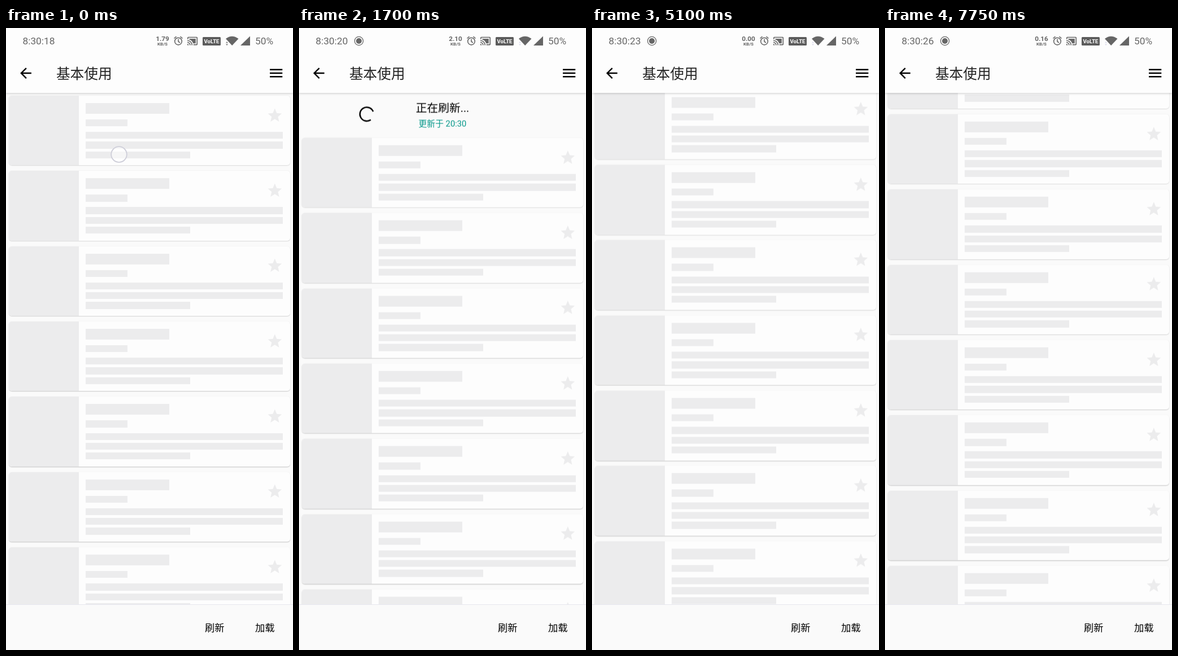
Write an HTML page that moves like this. It is 508x1102 px and loops after 8000 ms.

```html
<!DOCTYPE html>
<html lang="zh-CN">
<head>
<meta charset="utf-8">
<style>
  html, body { margin: 0; width: 100%; height: 100%; overflow: hidden; background: #fafafa; }
  #stage { position: relative; width: 508px; height: 1102px; overflow: hidden; background: #fafafa; }
  #stage, text { font-family: Roboto, "Noto Sans CJK SC", "Noto Sans CJK", sans-serif; }
  #view { position: absolute; left: 0; top: 114.6px; width: 508px; height: 906.9px; overflow: hidden; }
  #list { position: absolute; left: 0; top: 0; width: 508px; will-change: transform; }
  .card { position: absolute; left: 4.9px; width: 498.2px; height: 123.5px; border-radius: 5px; background: #fdfdfd;
    box-shadow: 0 var(--drop) 1.5px rgba(0,0,0,.16), 0 .5px 2.5px rgba(0,0,0,.06); }
  .card i { position: absolute; background: #ececed; }
  .card svg { position: absolute; left: 456.3px; top: 19.7px; width: 29.6px; height: 29.6px; fill: #ececed; }
  .panel { position: absolute; left: 0; width: 508px; height: 74.1px; overflow: visible; }
  .panel text { text-anchor: middle; }
  .panel .info { font-size: 14.8px; fill: #009688; }
  .panel .title { font-size: 19.75px; }
  #bar { position: absolute; left: 0; top: 0; width: 508px; height: 114.6px; background: #fdfdfd;
    box-shadow: 0 1px 4px rgba(0,0,0,.2); }
  #buttons { position: absolute; left: 0; top: 1021px; width: 508px; height: 81px; background: #fafafa;
    box-shadow: inset 0 1px #e6e6ee; }
  #top { position: absolute; left: 0; top: 0; }
  .status { fill: #666; }
  .speed { font-weight: 700; text-anchor: middle; }
</style>
</head>
<body>
<div id="stage">
  <div id="view"><div id="list"></div></div>
  <div id="bar"></div>
  <div id="buttons"></div>
  <svg id="top" width="508" height="1102">
    <g class="status">
      <text id="clock" x="29.5" y="29.3" font-size="17.3"></text>
      <g id="rec">
        <circle cx="106" cy="23" r="7.6" fill="none" stroke="#666" stroke-width="1.3"/>
        <circle cx="106" cy="23" r="5"/>
      </g>
      <text id="speed" class="speed" x="277" y="22.6" font-size="11.8"></text>
      <text class="speed" x="277" y="30.8" font-size="8">KB/S</text>
      <g fill="none" stroke="#666" stroke-width="1.6">
        <circle cx="305" cy="23.6" r="6.3"/>
        <path d="M305 19.5v4.5l3 2M297.5 18.5l4-3.3M312.5 18.5l-4-3.3"/>
      </g>
      <path transform="translate(320.2 13.2) scale(.82)" d="M21 3H3c-1.100 0-2 .9-2 2v3h2V5h18v14h-7v2h7c1.100 0 2-.9 2-2V5c0-1.100-.9-2-2-2zM1 18v3h3c0-1.660-1.340-3-3-3zm0-4v2c2.760 0 5 2.240 5 5h2c0-3.870-3.130-7-7-7zm0-4v2c4.970 0 9 4.030 9 9h2c0-6.080-4.930-11-11-11zM19 7H5v1.630c3.960 1.280 7.090 4.410 8.370 8.370H19z"/>
      <rect x="348" y="16" width="32" height="15" rx="1.5" fill="#5c5c5c"/>
      <text x="364" y="27.2" font-size="9.6" font-weight="700" text-anchor="middle" fill="#fff">VoLTE</text>
      <path d="M389 19Q400 10.500 411.500 19L400.200 31z"/>
      <path id="net" d="M389 26.500l2-2.500 2 2.500zM389 28.500l2 2.500 2-2.500z"/>
      <path d="M432 14.500V31H415z"/>
      <text x="441" y="29.3" font-size="17.3">50%</text>
    </g>
    <path transform="translate(20.200 65.200) scale(1.235)" d="M20 11H7.830l5.590-5.590L12 4l-8 8 8 8 1.410-1.410L7.830 13H20z"/>
    <path transform="translate(463.300 65.200) scale(1.235)" d="M3 18h18v-2H3zm0-5h18v-2H3zm0-7v2h18V6z"/>
    <text x="88.9" y="89.8" font-size="24.7" fill="#222">基本使用</text>
    <text x="352" y="1069.3" font-size="17.3" font-weight="500">刷新</text>
    <text x="441" y="1069.3" font-size="17.3" font-weight="500">加载</text>
    <circle id="finger" r="13.8" fill="rgba(255,255,255,.5)" stroke="#ceced9" stroke-width="1.8"/>
  </svg>
</div>
<script>
const LOOP = 8000, VIEW = 906.9, PITCH = 133.35, PANEL = 74.1, ROWS = 20;
const END = ROWS * PITCH + PANEL - VIEW;
const RELEASE = 1045, REFRESHED = 3100, COLLAPSE = 4000, LOADED = 7750;
const PULL = { from: 180, ms: 800, dist: 455 };
const FLICK = { from: 4850, ms: 150, dist: 330, glide: 1898, drag: .135 };
const R1 = 9.08, R2 = 22.04;            // decay rates of the overdamped spring
const $ = id => document.getElementById(id);
const clamp = v => Math.max(0, Math.min(1, v));
const list = $('list'), cards = [];

function addCard(row) {
  const bars = [[0, 0, 124, 123.5], [136, 13, 148, 19], [136, 42, 74, 12.3],
    [136, 64.2, 349, 12.3], [136, 81.5, 349, 12.3], [136, 98.8, 185, 12.3]];
  const card = document.createElement('div');
  card.className = 'card';
  card.style.top = row * PITCH + 4.94 + 'px';
  card.innerHTML = bars.map(([x, y, w, h], i) =>
    `<i style="left:${x}px;top:${y}px;width:${w}px;height:${h}px;${i ? '' : 'border-radius:5px 0 0 5px'}"></i>`).join('') +
    '<svg viewBox="0 0 24 24"><path d="M12 17.270L18.180 21l-1.640-7.030L22 9.240l-7.190-.61L12 2 9.190 8.630 2 9.240l5.460 4.730L5.820 21z"/></svg>';
  list.append(card);
  cards.push(card);
  return card;
}

function addPanel(top) {
  list.insertAdjacentHTML('beforeend', `<svg class="panel" style="top:${top}px">
    <g transform="translate(118 37.5)">
      <g class="arrow"><path transform="scale(1.235) translate(-12 -12)" d="M4 12l1.410 1.410L11 7.830V20h2V7.830l5.580 5.590L20 12l-8-8z"/></g>
      <path class="check" transform="scale(1.235) translate(-12 -12)" d="M9 16.200L4.800 12l-1.400 1.400L9 19 21 7l-1.400-1.400z"/>
    </g>
    <circle class="spin" cx="120" cy="37" r="12.2" fill="none" stroke="#000" stroke-width="2.5" stroke-linecap="square"/>
    <text class="title" x="254" y="33.4"></text>
    <text class="info" x="254" y="59.2">更新于 20:30</text></svg>`);
  const el = list.lastElementChild, q = c => el.querySelector('.' + c);
  return { el, title: q('title'), arrow: q('arrow'), check: q('check'), spin: q('spin') };
}

// cubic-bezier(.4, 0, .2, 1)
function ease(x) {
  let lo = 0, hi = 1, u = .5;
  for (let i = 0; i < 20; i++) {
    u = (lo + hi) / 2;
    const at = 1.2 * u * (1 - u) ** 2 + .6 * u * u * (1 - u) + u ** 3;
    if (at < x) lo = u; else hi = u;
  }
  return 3 * u * u * (1 - u) + u ** 3;
}

function spin(el, ms) {
  const p = (ms % 1333) / 1333;
  const head = ease(clamp(p * 2)), tail = ease(clamp(p * 2 - 1));
  const start = -90 + ms / 2222 * 360 + ms / 1333 * 90 + tail * 270;
  const sweep = Math.max(.01, (head - tail) * 270) * Math.PI / 180;
  el.setAttribute('stroke-dasharray', `${sweep * 12.2} 200`);
  el.setAttribute('transform', `rotate(${start} 120 37)`);
}

const settle = s => (R2 * Math.exp(-R1 * s) - R1 * Math.exp(-R2 * s)) / (R2 - R1);
const kick = s => (Math.exp(-R1 * s) - Math.exp(-R2 * s)) / (R2 - R1);
const pulled = t => PULL.dist * (1 - Math.cos(Math.PI * clamp((t - PULL.from) / PULL.ms))) / 2;
const speedUp = -FLICK.glide * Math.log(FLICK.drag);
const power = speedUp * FLICK.ms / 1000 / FLICK.dist;
const flicked = t => FLICK.dist * clamp((t - FLICK.from) / FLICK.ms) ** power;
const endTime = Math.log(1 - (END - FLICK.dist) / FLICK.glide) / Math.log(FLICK.drag);

// overscroll resists more the further it is pulled
function stretch(d) {
  const k = .52 * d / VIEW;
  return VIEW * k / (1 + k);
}

function offset(t) {
  if (t < RELEASE) return stretch(pulled(t));
  if (t < COLLAPSE) return PANEL + (stretch(PULL.dist) - PANEL) * settle((t - RELEASE) / 1000);
  if (t < FLICK.from) return PANEL * settle((t - COLLAPSE) / 1000);
  const s = (t - FLICK.from - FLICK.ms) / 1000;
  if (s < 0) return -flicked(t);
  if (s < endTime) return -FLICK.dist - FLICK.glide * (1 - FLICK.drag ** s);
  return -END - speedUp * FLICK.drag ** endTime * kick(s - endTime);
}

for (let i = 0; i < ROWS; i++) addCard(i);
const header = addPanel(-PANEL), footer = addPanel(ROWS * PITCH);
const extra = [addCard(ROWS), addCard(ROWS + 1)];
const show = (el, on) => { el.style.display = on ? '' : 'none'; };
const READY = 529, LOAD_SPIN = 5560;
footer.title.textContent = '正在加载...';
show(footer.arrow, false);
show(footer.check, false);

// the light sits above the screen, so shadows lengthen further down
function drawList(t) {
  const y = offset(t);
  list.style.transform = `translateY(${y}px)`;
  cards.forEach((card, row) =>
    card.style.setProperty('--drop', .4 + 1.3 * clamp((row * PITCH + y) / VIEW) + 'px'));
}

function drawHeader(t) {
  const busy = t >= RELEASE && t < REFRESHED;
  header.title.textContent = t < READY ? '拉动刷新' : t < RELEASE ? '释放刷新' : busy ? '正在刷新...' : '刷新完成';
  show(header.arrow, t < RELEASE);
  show(header.spin, busy);
  show(header.check, t >= REFRESHED);
  header.arrow.setAttribute('transform', `rotate(${180 * (1 - clamp((t - READY) / 200))})`);
  if (busy) spin(header.spin, t - RELEASE);
}

function drawFinger(t) {
  const finger = $('finger');
  const flick = t >= FLICK.from && t < FLICK.from + FLICK.ms;
  show(finger, t < RELEASE || flick);
  const d = pulled(t);
  finger.setAttribute('cx', flick ? 220 + flicked(t) * .06 : 200 - 14 * d / PULL.dist);
  finger.setAttribute('cy', flick ? 760 - flicked(t) : 224 + d);
}

function drawStatus(t) {
  $('clock').textContent = '8:30:' + (18 + Math.floor((t + 350) / 1000));
  $('speed').textContent = t < 650 ? '1.79' : t < 3650 ? '2.10' : t < 6650 ? '0.00' : '0.16';
  show($('rec'), t >= 650);
  $('net').setAttribute('fill', t < 1650 ? '#777' : '#dcdcec');
}

function draw(now) {
  const t = now % LOOP;
  drawList(t);
  drawHeader(t);
  show(footer.el, t > FLICK.from && t < LOADED);
  spin(footer.spin, Math.max(0, t - LOAD_SPIN));
  extra.forEach(card => show(card, t >= LOADED));
  drawFinger(t);
  drawStatus(t);
}

const begin = performance.now();
function tick() {
  draw(performance.now() - begin);
  requestAnimationFrame(tick);
}
tick();
</script>
</body>
</html>
```
